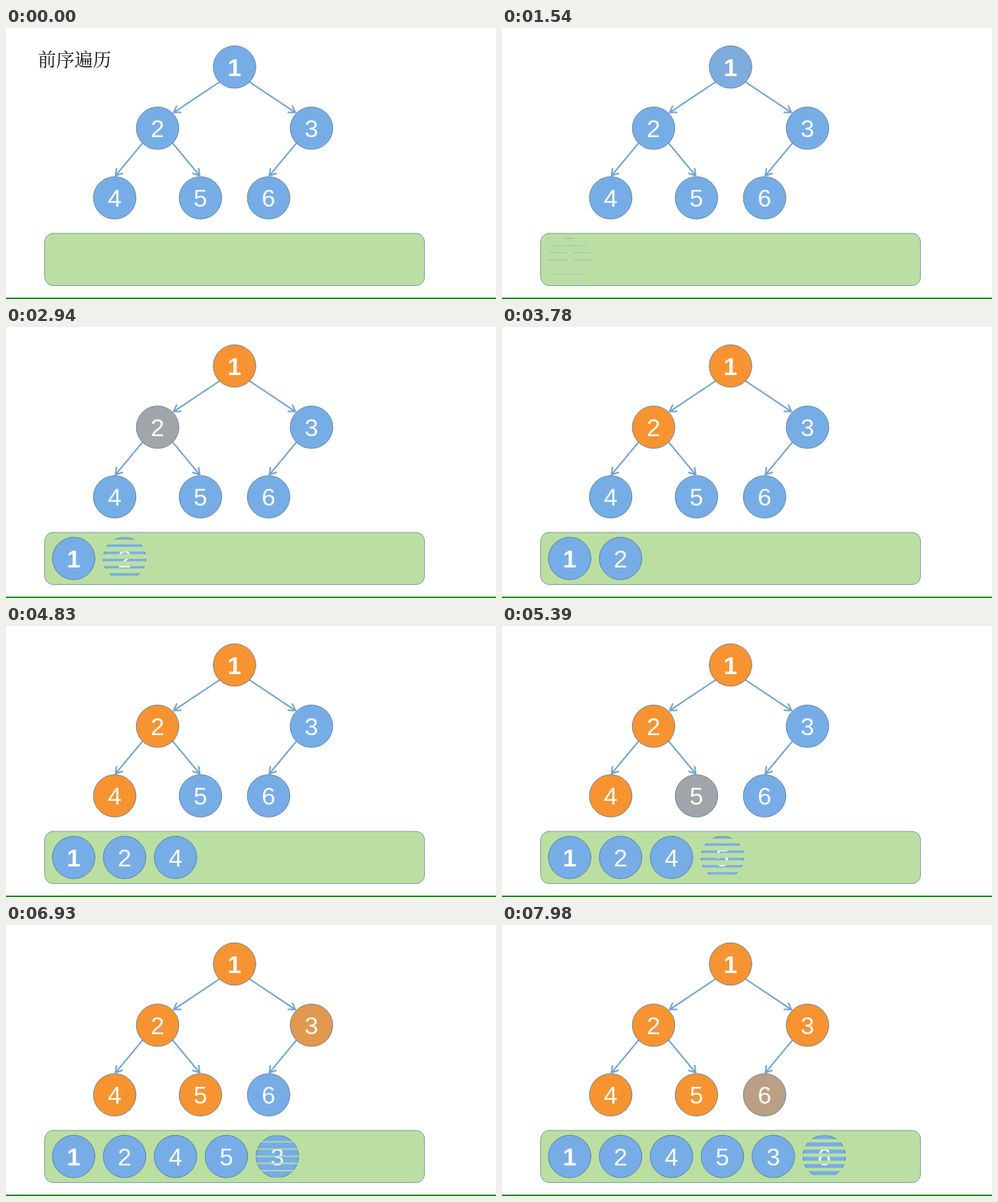
An HTML page with a canvas for the animation above (8000 ms loop, 640 by 355 pixels).

```html
<!DOCTYPE html>
<html lang="zh">
<head>
<meta charset="utf-8">
<style>
html, body { margin: 0; width: 100%; height: 100%; overflow: hidden; background: #fff; }
canvas { display: block; }
</style>
</head>
<body>
<canvas id="stage" width="640" height="355"></canvas>
<script>
const ctx = document.getElementById('stage').getContext('2d');
const LOOP = 8000, START = 1510, STEP = 1230, FADE = 600;
const COUNT = 6, R = 27.8, STRIPS = 6;
const BLUE = [119, 173, 230], ORANGE = [247, 148, 49];

// Heap numbering: the children of node n are 2n and 2n + 1.
const nodes = { 1: { x: 298.5, y: 51.1 } };
const isLeafRow = n => n > 3;
for (let n = 2; n <= COUNT; n++) {
  const parent = nodes[n >> 1], side = n % 2 ? 1 : -1;
  nodes[n] = {
    x: parent.x + side * (isLeafRow(n) ? 56 : 100.5),
    y: parent.y + (isLeafRow(n) ? 91.2 : 80.2),
  };
}
const preorder = n => n > COUNT ? [] : [n, ...preorder(2 * n), ...preorder(2 * n + 1)];
const order = preorder(1);

const mix = p => `rgb(${BLUE.map((c, i) => Math.round(c + (ORANGE[i] - c) * p))})`;

function drawNode(label, x, y, fill) {
  ctx.beginPath();
  ctx.arc(x, y, R, 0, 2 * Math.PI);
  ctx.fillStyle = fill;
  ctx.fill();
  ctx.strokeStyle = 'rgba(70, 110, 150, 0.7)';
  ctx.lineWidth = 1;
  ctx.stroke();
  ctx.fillStyle = '#fff';
  ctx.textAlign = 'center';
  ctx.font = `${label === 1 ? 'bold ' : ''}32px "Liberation Sans", Arial, sans-serif`;
  ctx.fillText(label, x, y + 11.5);
}

// Leaves the parent's lower corner; meets the child's upper corner, or the top of a leaf.
function drawArrow(child) {
  const from = nodes[child >> 1], to = nodes[child];
  const side = child % 2 ? 1 : -1, corner = R * Math.SQRT1_2;
  const x1 = from.x + side * corner, y1 = from.y + corner;
  const endX = isLeafRow(child) ? to.x : to.x - side * corner;
  const endY = to.y - (isLeafRow(child) ? R : corner);
  const angle = Math.atan2(endY - y1, endX - x1);
  const back = (x, y, length, turn = 0) =>
    [x - length * Math.cos(angle + turn), y - length * Math.sin(angle + turn)];
  const tip = back(endX, endY, 1.5);
  ctx.beginPath();
  ctx.moveTo(x1, y1);
  ctx.lineTo(...tip);
  ctx.moveTo(...back(...tip, 9.5, 0.55));
  ctx.lineTo(...tip);
  ctx.lineTo(...back(...tip, 9.5, -0.55));
  ctx.strokeStyle = '#72a4d2';
  ctx.lineWidth = 2;
  ctx.lineCap = ctx.lineJoin = 'round';
  ctx.stroke();
}

function drawPanel() {
  ctx.beginPath();
  ctx.roundRect(50.6, 269.1, 496, 68.3, 11);
  ctx.fillStyle = '#bbdfa2';
  ctx.fill();
  ctx.strokeStyle = '#7a9fa8';
  ctx.lineWidth = 1;
  ctx.stroke();
}

// Venetian blinds: every strip opens from its top edge downwards.
function drawResult(label, slot, p) {
  const x = 88.4 + slot * 66.5, y = 303.2;
  const top = y - R, strip = 2 * (R + 0.5) / STRIPS;
  ctx.save();
  if (p < 1) {
    ctx.beginPath();
    for (let i = 0; i < STRIPS; i++) ctx.rect(x - 30, top + i * strip, 60, strip * p);
    ctx.clip();
  }
  drawNode(label, x, y, mix(0));
  ctx.restore();
}

function draw() {
  const t = performance.now() % LOOP;
  ctx.fillStyle = '#fff';
  ctx.fillRect(0, 0, 640, 355);
  ctx.fillStyle = '#008000';
  ctx.fillRect(0, 353.3, 640, 1.7);
  if (t < START) {
    ctx.fillStyle = '#111';
    ctx.textAlign = 'left';
    ctx.font = '300 24px "Noto Serif CJK SC", "Noto Sans CJK SC", serif';
    ctx.fillText('前序遍历', 41.5, 50);
  }
  drawPanel();
  for (let n = 2; n <= COUNT; n++) drawArrow(n);
  order.forEach((n, slot) => {
    const p = Math.min(1, Math.max(0, (t - START - slot * STEP) / FADE));
    drawNode(n, nodes[n].x, nodes[n].y, mix(p));
    if (p > 0) drawResult(n, slot, p);
  });
  requestAnimationFrame(draw);
}
draw();
</script>
</body>
</html>
```
